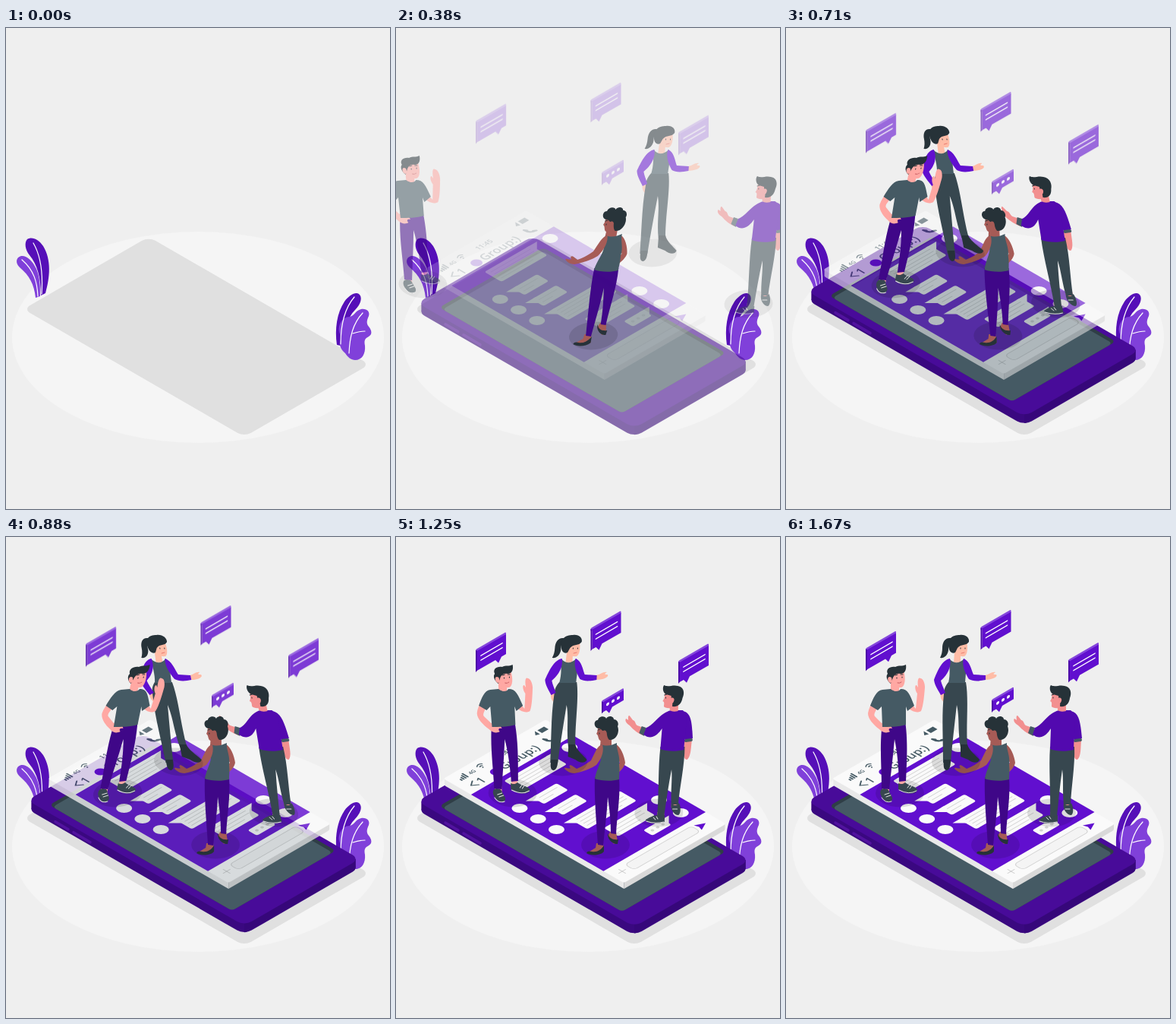
These frames come from a looping animation (506 by 633 pixels, 1.71 s). An HTML page:

```html
<!DOCTYPE html>
<html lang="en">
<head>
<meta charset="utf-8">
<title>Group chat</title>
<style>
  html, body { margin: 0; height: 100%; overflow: hidden; background: #efefef; }
  svg { display: block; width: 100vw; height: 100vh; }
  text { font-family: "Open Sans", "Noto Sans", sans-serif; font-weight: 600; fill: #455a64; }
  .line { fill: none; stroke-linecap: round; stroke-linejoin: round; }
  .hair { fill: #263238; }
  .grey { fill: #455a64; }
  .slacks { fill: #37474f; }
  .base { fill: #610fcf; }
  .navy { fill: #3f0788; }
  .knit { fill: #5209af; }
  .pink { fill: #ffa8a3; }
  .peach { fill: #ffbca6; }
  .rose { fill: #f28f8f; }
  .brown { fill: #a65b56; }
  .shade { fill: #000; opacity: .12; }
</style>
</head>
<body>
<svg id="stage" viewBox="0 0 506 633"></svg>
<script>
const LOOP = 1710, FAST = 950, SLOW = 1650, RUSH = 1610;
const PURPLE = '#610fcf';

// Isometric plane: x runs up-right, y runs down-right.
const iso = (x, y, body) => `<g transform="matrix(.866 -.5 .866 .5 ${x} ${y})">${body}</g>`;
const rect = (x, y, w, h, r, fill) =>
  `<rect x="${x}" y="${y}" width="${w}" height="${h}" rx="${r}" fill="${fill}"/>`;
const dot = (x, y, r, fill) => `<circle cx="${x}" cy="${y}" r="${r}" fill="${fill}"/>`;
const shape = (cls, d) => `<path class="${cls}" d="${d}"/>`;
const line = (color, width, d) =>
  `<path class="line" stroke="${color}" stroke-width="${width}" d="${d}"/>`;
const shade = (x, y) => `<ellipse class="shade" cx="${x}" cy="${y}" rx="32" ry="18.5"/>`;
const group = (id, body) => `<g id="${id}" opacity="0">${body}</g>`;

function message(x, y, w, h, rows, mine) {
  const tail = mine ? `M${x + w - 6} ${y}h16l-10 10h-6z` : `M${x + 6} ${y}h-16l10 10h6z`;
  let body = rect(x, y, w, h, 3, '#fafafa') + `<path fill="#fafafa" d="${tail}"/>`;
  for (let i = 0; i < rows; i++) {
    const short = i === rows - 1 ? 12 : 0;
    body += line('#d2d2d2', 1, `M${x + 5} ${y + (i + 1) * h / (rows + 1)}h${w - 10 - short}`);
  }
  return body;
}

function speech(x, y, w, h, tail, lines) {
  const face = `<g transform="matrix(1 -.577 0 1 ${x} ${y})">` +
    `<path fill="#8446dc" d="M0 0L1-1H${w - 1}L${w} 0V3H0z"/>` +
    `<path fill="${PURPLE}" d="M2 2H${w}V${h}H${tail + 5}L${tail + 1} ${h + 6}L${tail - 3} ${h}H2z"/>` +
    `<path fill="#4d0aa8" d="M0 0L2 2V${h}L0 ${h + 1}z"/>`;
  return face + lines + '</g>';
}

const plants = `
  <path fill="#560fb8" d="M46 352C46 328 41 311 31 299C25 292 24 282 28 278C34 274 43 278 49 287C60 305 58 328 52 349z"/>
  <path fill="#8040da" d="M39 355C37 337 31 326 18 315C12 309 13 302 20 300C27 299 35 306 40 317C45 329 45 341 45 353z"/>
  <path fill="#560fb8" d="M436 417C433 396 436 375 446 360C452 352 460 347 465 350C470 354 468 363 460 371C449 382 446 398 445 419z"/>
  <path fill="#8040da" d="M460 437C455 437 450 433 447 428C441 423 438 416 441 410C443 405 437 402 439 393C441 384 447 380 453 380C459 379 460 372 468 370C475 369 480 373 478 379C476 384 474 388 478 393C482 398 483 403 478 406C472 409 472 412 473 418C474 429 469 437 460 437z"/>`
  + line('#fff', 1.2, 'M36 283C46 300 49 321 47 350M21 305C37 319 41 334 42 353M459 354C447 368 441 390 441 416M470 375C457 389 453 406 452 428M457 402C463 400 468 399 473 399');

const body = fill => rect(0, 0, 175.5, 330.3, 11, fill);
const phone =
  iso(28, 359.3, body('#3a0880')) +
  '<path fill="#3a0880" d="M33.4 348V359.5L460.6 436.5V425z"/>' +
  '<path fill="#36077a" d="M314 505L460.6 425V437C460 439 459 440 457 441L319 520Q316 521.5 314 521.5z"/>' +
  iso(28, 347.8, body('#480b99')) +
  line('#52129f', 3.5, 'M65 376L82 386M89 390L111 403') +
  iso(57, 354, rect(0, 0, 158, 278, 6, '#2f3e46') + rect(0, 5, 153, 273, 5, '#455a64'));

const screenTop =
  rect(0, 0, 155.5, 274.6, 3, '#fafafa') +
  rect(0, 42, 155.5, 201.5, 0, PURPLE) +
  line('#455a64', 2, 'M12 16v-2M15 16v-4M18 16v-6M21 16v-8') +
  line('#455a64', 1.2, 'M41 10q4-4 8 0M43 12.5q2-2 4 0') + dot(45, 15, 1, '#455a64') +
  '<text x="26" y="15.5" font-size="7">4G</text><text x="67" y="16" font-size="9">11:45</text>' +
  '<path fill="#455a64" d="M127 13l5-6v8zM135 8h10v7h-10z"/>' +
  line('#455a64', 1.6, 'M19 25l-7 5 7 5') +
  '<text x="22" y="36" font-size="15">1</text>' + dot(49, 31, 6.5, PURPLE) +
  '<text x="58" y="35" font-size="15.5" font-weight="700">Group:)</text>' +
  line('#455a64', 2.8, 'M128 24q0 9 9 10M128 24l2 3M137 34l-3-2') +
  message(43, 49, 70, 26, 4, true) +
  message(43, 92, 37, 18, 2) +
  message(43, 121, 37, 18, 2) +
  message(43, 150, 75, 26, 4) +
  message(57, 187, 56, 22, 3, true) +
  message(84, 220, 29, 14, 0, true) +
  [91, 99, 107].map(x => dot(x, 227, 2, '#d2d2d2')).join('') +
  [[137, 55], [136, 192], [135.6, 225.6], [19, 97], [19, 125], [19, 153]]
    .map(([x, y]) => dot(x, y, 8.6, '#fafafa')).join('') +
  line('#d2d2d2', 1.3, 'M9 258h10M14 253v10') +
  `<rect x="25" y="251" width="101" height="14" rx="5" fill="#f4f4f4" stroke="#d2d2d2"/>` +
  `<path fill="${PURPLE}" d="M129 252L141 258L129 264L131 258z"/>`;
const screen =
  '<path fill="#e9e9e9" d="M62.5 318L299 454V463L64 328Q62.5 327 62.5 326z"/>' +
  '<path fill="#d9d9d9" d="M299 454L432 377V384Q432 386 430 387L299 463z"/>' +
  iso(61, 318, screenTop);

const chatLines = line('#fff', 1.6, 'M7 11H35M7 17H35');
const typing = [8, 15, 22].map(x => dot(x, 8, 2, '#fff')).join('');
const bubbles =
  speech(105, 147.5, 40, 28, 29, chatLines) +
  speech(256.5, 119.5, 40, 28, 10, chatLines) +
  speech(372, 162.5, 40, 28, 10, chatLines) +
  speech(271, 215, 29, 15, 9, typing);

const frontWoman = shade(276, 405) +
  shape('brown', 'M264 403L273 403L274 414C268 418 259 419 253 415L263 409zM282 388L290 388L292 401L287 404L279 394z') +
  shape('hair', 'M274 406V414C270 419 257 420 251 416C252 413 255 413 258 414C265 415 270 412 274 406zM279 390C281 396 285 399 293 398L292 404C286 405 278 398 279 390z') +
  shape('brown', 'M290 273C296 276 301 288 302 297C301 303 296 308 291 312L288 306L295 297L287 284z') +
  shape('navy', 'M262 316H294C296 342 291 368 290 391L283 390C283 370 281 357 279 342C278 365 275 385 273 406L266 405C264 374 261 342 262 316z') +
  shape('brown', 'M270 262H284V276H269z') +
  shape('grey', 'M270 273C278 276 285 274 291 271C290 280 296 288 294 300C295 308 294 314 294 319C284 322 270 321 262 318C264 306 270 298 270 290C267 284 268 277 270 273z') +
  shape('brown', 'M272 273C275 284 269 294 264 300C255 306 244 309 235 311C230 311 225 308 222 305C222 302 228 306 230 304C227 302 229 299 232 301L238 305C246 302 252 298 257 294C262 285 265 274 272 273z') +
  shape('brown', 'M267 247L283 247L285 262C281 269 271 270 268 267C266 264 267 261 264 259C266 256 266 251 267 247z') +
  shape('hair', 'M267 252C260 251 260 241 266 241C267 235 276 235 277 239C280 234 287 236 287 240C292 240 294 246 292 249C295 256 291 268 281 267C277 263 279 258 276 255C272 257 270 251 267 252z') +
  shape('brown', 'M273 255c4-2 6 3 3 6c-3 1-4-2-3-6z') +
  line('#263238', 1, 'M266 254l3-1M268 258v1');

const backWoman = shade(224, 296) +
  shape('hair', 'M217 133C210 132 206 138 206 146C206 151 205 155 203 159C208 160 213 156 214 149C214 144 214 140 217 138z') +
  shape('peach', 'M262 182C268 181 271 177 276 178C273 180 272 181 277 181C280 184 272 188 262 188zM204 205L211 205C217 209 217 214 215 216L213 213L213 219C207 219 202 212 204 205z') +
  shape('slacks', 'M214 191H237C241 212 237 250 239 274L230 277C226 255 229 238 225 221C222 247 219 273 217 297L207 297C207 265 205 235 208 207C208 199 211 195 214 191z') +
  shape('hair', 'M208 293L217 293C217 301 216 306 212 307C208 307 207 302 208 293zM230 273L239 273C241 281 251 288 255 293C253 299 245 297 240 293L230 289z') +
  shape('peach', 'M222 152H230V165H221z') +
  shape('grey', 'M215 160C222 168 229 166 235 160C239 167 237 178 236 192H214C217 180 215 170 215 160z') +
  shape('base', 'M216 160C205 162 199 178 195 188C196 196 201 202 204 208L210 205C208 199 205 194 204 189C210 184 219 173 216 160zM234 160C242 163 244 174 247 181L263 182V188C254 190 246 190 241 187C237 181 231 169 234 160z') +
  shape('peach', 'M221 138L238 137C240 146 239 155 235 157C229 158 223 154 221 149z') +
  shape('hair', 'M215 148C211 134 219 129 229 129C237 128 242 133 241 138C237 144 231 140 226 146L223 152C219 154 216 151 215 148z') +
  line('#263238', 1, 'M230 146v1M236 146v1') + line('#e8756c', .9, 'M231 153l4-1');

const leftMan = shade(150, 337) +
  shape('pink', 'M127 327H136V337H127zM149 318H157V328H149z') +
  shape('slacks', 'M125 333C128 330 133 331 135 333L140 343C141 350 133 351 129 346C125 341 123 337 125 333zM148 324C151 326 155 325 157 323C163 328 172 328 173 333C171 339 160 338 155 336L148 332z') +
  line('#e0e0e0', 1, 'M130 339l6-2M132 342l6-2M160 330l3-4M163 331l3-4M126 343q5 8 13 5M149 333q13 7 23 1') +
  shape('navy', 'M127 244L157 242C161 270 159 298 158 321L149 322C148 300 147 285 143 266C141 290 138 312 136 332L126 331C126 300 123 275 127 244z') +
  shape('pink', 'M114 217L120 225C118 230 115 233 117 236L126 245C132 243 138 246 140 252C136 251 134 253 137 256C132 259 127 257 123 253C115 247 108 239 108 232C109 226 111 222 114 217zM159 218L165 219L171 226L173 206C169 200 170 194 172 195L174 198C173 190 174 184 177 186C181 186 183 193 183 198C182 210 181 222 178 229C172 233 164 228 159 224z') +
  shape('pink', 'M138 192H149V207H138z') +
  shape('grey', 'M138 200C144 205 149 203 151 200C161 200 163 207 169 222L160 229L158 223V247C149 250 135 250 127 250L126 223L121 228L111 222C115 212 119 202 127 201z') +
  shape('pink', 'M137 178L155 176C158 186 157 196 152 198C145 199 139 195 137 190z') +
  shape('hair', 'M138 193C133 189 131 183 134 180C131 174 137 170 144 171C149 168 153 171 158 168C159 174 157 180 151 180C146 179 143 181 141 185z') +
  shape('pink', 'M139 185c-4-3-6 1-4 5c2 3 4 2 5 0z') +
  line('#263238', 1.1, 'M146 185v1M153 184v1M144 182l3-1M151 181l3 0') + line('#c95c60', 1, 'M147 192q3 1 5-1');

const rightMan = shade(350, 363) +
  shape('rose', 'M348 362H357V371H348zM366 347H375V356H366z') +
  shape('slacks', 'M333 372C338 369 344 366 348 366L358 366V375C350 378 334 378 333 372zM366 350C369 354 373 354 376 350C379 356 379 364 376 366C370 366 364 358 366 350z') +
  line('#e0e0e0', 1, 'M343 369l3 3M347 368l2 3M334 374q11 4 23 1M368 358l6 0') +
  shape('rose', 'M379 268H389C388 278 389 288 384 293C378 293 379 282 379 268z') +
  shape('slacks', 'M348 276H380C381 301 376 328 375 352L366 352C364 336 366 320 364 306C361 326 359 348 357 368L348 367C349 335 346 304 348 276z') +
  shape('knit', 'M375 229C387 231 388 245 390 265L380 268L376 256z') +
  line('#455a64', 4, 'M381 268L388 267') +
  shape('rose', 'M327 252L324 261C316 258 311 253 306 248C301 245 299 241 301 239L304 241C303 237 304 233 306 236L310 241C314 242 313 246 316 248z') +
  shape('grey', 'M322 249L328 251L326 262L319 258z') +
  shape('knit', 'M360 228L375 228C383 234 380 250 379 280C368 283 356 282 348 279L349 252C342 263 334 267 325 260L328 251C339 247 344 232 360 228z') +
  shape('rose', 'M357 215H369V229Q362 231 358 228z') +
  shape('rose', 'M351 204L368 205L366 222C361 226 352 226 350 223C350 220 351 217 348 216C351 212 350 208 351 204z') +
  shape('hair', 'M352 207C347 204 347 197 349 195C354 198 361 194 367 196C375 197 377 205 374 212C373 220 368 224 361 223C362 217 359 214 359 209z') +
  shape('rose', 'M359 212c4-2 6 3 2 7c-3 1-3-3-2-7z') +
  line('#263238', 1, 'M352 211v1M350 208l3-1');

const stage = document.getElementById('stage');
stage.innerHTML =
  '<rect width="506" height="633" fill="#efefef"/><ellipse cx="253" cy="407" rx="245" ry="139" fill="#f5f5f5"/>' +
  iso(23, 370, rect(0, 0, 190.5, 336, 10, '#e0e0e0')) + plants +
  group('phone', phone) + group('screen', screen) +
  group('rightMan', rightMan) + group('frontWoman', frontWoman) +
  group('backWoman', backWoman) + group('leftMan', leftMan) + group('bubbles', bubbles);

// cubic-bezier(.36, -.01, .5, 1.38), solved by bisection
function ease(x) {
  if (x >= 1) return 1;
  const curve = (a, b, s) => 3 * (1 - s) ** 2 * s * a + 3 * (1 - s) * s * s * b + s ** 3;
  let low = 0, high = 1;
  for (let i = 0; i < 24; i++) {
    const mid = (low + high) / 2;
    if (curve(.36, .5, mid) < x) low = mid; else high = mid;
  }
  return curve(-.01, 1.38, low);
}

function pose(id, transform, opacity) {
  const node = document.getElementById(id);
  node.setAttribute('transform', transform);
  node.setAttribute('opacity', Math.max(0, Math.min(1, opacity)));
}

function slide(id, progress, dx, dy) {
  const e = ease(progress), rest = 1 - e;
  pose(id, `translate(${dx * rest} ${dy * rest})`, e);
}

// Rush in from one side, lean past upright, rock back. side: -1 left, 1 right.
function rush(id, progress, side, pivot) {
  let shift = 0, lean, opacity = 1;
  if (progress < .6) {
    opacity = ease(progress / .6);
    shift = 253 * (1 - opacity);
    lean = 20 - 30 * opacity;
  } else if (progress < .8) {
    lean = -10 + 12 * ease((progress - .6) / .2);
  } else {
    lean = 2 - 2 * ease((progress - .8) / .2);
  }
  pose(id, `translate(${side * shift} ${pivot}) skewX(${-side * lean}) translate(0 ${-pivot})`, opacity);
}

const start = performance.now();
function draw() {
  const t = (performance.now() - start) % LOOP;
  slide('phone', t / FAST, 0, 30);
  slide('screen', t / SLOW, -30, 0);
  slide('bubbles', t / SLOW, 0, -30);
  rush('frontWoman', t / FAST, -1, 328);
  rush('backWoman', t / RUSH, 1, 217);
  rush('leftMan', t / RUSH, -1, 260);
  rush('rightMan', t / RUSH, 1, 286);
  requestAnimationFrame(draw);
}
draw();
</script>
</body>
</html>
```
